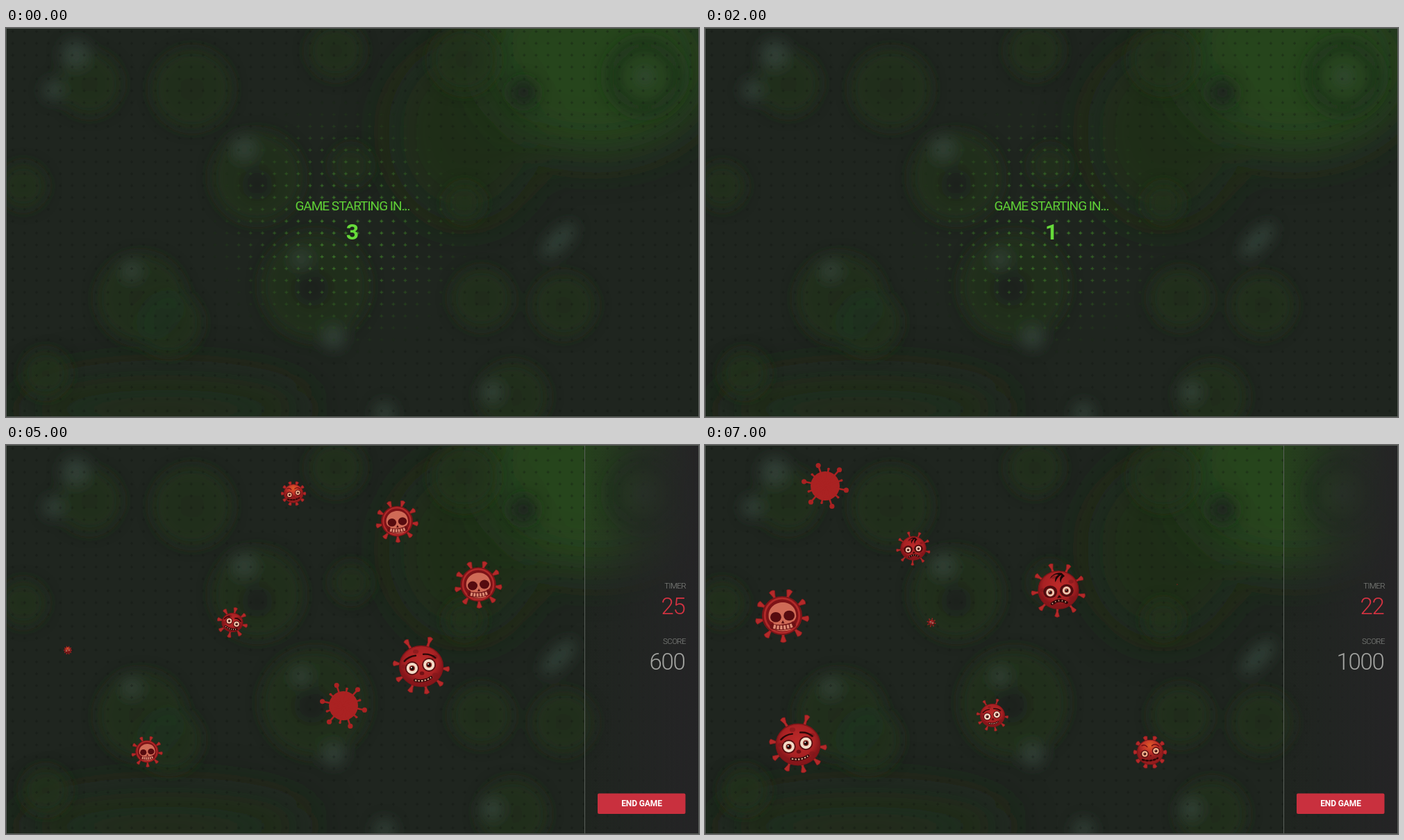
Recreate the animation shown at these times as an HTML page. Size 998 by 561 pixels, loop 8000 ms.

```html
<!DOCTYPE html>
<html lang="en">
<head>
<meta charset="utf-8">
<title>Virus game</title>
<style>
html, body { margin: 0; width: 100%; height: 100%; overflow: hidden; background: #1f251f; }
svg { display: block; width: 998px; height: 561px; }
text { font-family: Roboto, "Open Sans", sans-serif; }
.lead { font-size: 19px; font-weight: 400; letter-spacing: -1px; fill: #5fcf36; }
.count { font-size: 32px; font-weight: 700; fill: #66db3a; }
.label { font-size: 11.5px; font-weight: 300; letter-spacing: -.6px; fill: #8a8c88; }
.value { font-size: 33px; font-weight: 300; letter-spacing: -1.3px; }
.btn { font-size: 12px; font-weight: 700; letter-spacing: -.1px; fill: #fff; }
.mid { text-anchor: middle; }
.end { text-anchor: end; }
</style>
</head>
<body>
<svg viewBox="0 0 998 561" xmlns="http://www.w3.org/2000/svg">
  <defs>
    <filter id="soft" x="-10%" y="-10%" width="120%" height="120%"><feGaussianBlur stdDeviation="10"/></filter>
    <filter id="wide" x="-30%" y="-30%" width="160%" height="160%"><feGaussianBlur stdDeviation="32"/></filter>
    <pattern id="dark" x="1.2" y="-3.5" width="17.13" height="17.1" patternUnits="userSpaceOnUse">
      <path d="M6.5 8.5h4M8.5 6.5v4" stroke="#0c110d" stroke-width="1.5" opacity=".35"/>
    </pattern>
    <pattern id="lit" x="1.2" y="-3.5" width="17.13" height="17.1" patternUnits="userSpaceOnUse">
      <path d="M6.2 8.5h4.6M8.5 6.2v4.6" stroke="#3f7a2b" stroke-width="1.3"/>
    </pattern>
    <radialGradient id="spot"><stop offset=".2" stop-color="#fff"/><stop offset="1" stop-color="#000"/></radialGradient>
    <mask id="centre"><ellipse cx="485" cy="288" rx="205" ry="195" fill="url(#spot)"/></mask>
    <radialGradient id="cell">
      <stop offset=".2" stop-color="#1f2e1c"/><stop offset=".7" stop-color="#20341c"/><stop offset="1" stop-color="#20301d"/>
    </radialGradient>
    <linearGradient id="panel">
      <stop offset="0" stop-color="#242424" stop-opacity=".12"/>
      <stop offset=".5" stop-color="#242525" stop-opacity=".68"/>
      <stop offset="1" stop-color="#252426"/>
    </linearGradient>
    <radialGradient id="red" cy=".4"><stop offset="0" stop-color="#bd2a29"/><stop offset=".75" stop-color="#a82123"/><stop offset="1" stop-color="#86161a"/></radialGradient>
    <radialGradient id="coral" cy=".35"><stop offset="0" stop-color="#d6553e"/><stop offset=".7" stop-color="#c0372e"/><stop offset="1" stop-color="#981f20"/></radialGradient>
    <radialGradient id="orange" cy=".22"><stop offset="0" stop-color="#df5a29"/><stop offset=".6" stop-color="#bd3028"/><stop offset="1" stop-color="#921d1d"/></radialGradient>
  </defs>
  <rect width="998" height="561" fill="#1f251f"/>
  <g id="far" filter="url(#wide)" fill="#25441f"></g>
  <g id="near" filter="url(#soft)"></g>
  <rect width="998" height="561" fill="url(#dark)"/>
  <g id="scene"></g>
  <rect x=".5" y=".5" width="997" height="560" fill="none" stroke="#555a55"/>
</svg>
<script>
const $ = id => document.getElementById(id);
const oval = (x, y, rx, ry, fill, more = '') =>
  `<ellipse cx="${x}" cy="${y}" rx="${rx}" ry="${ry}" fill="${fill}" ${more}/>`;
const dot = (x, y, r, fill, more) => oval(x, y, r, r, fill, more);
const line = (d, color, width, more = '') =>
  `<path d="${d}" fill="none" stroke="${color}" stroke-width="${width}" stroke-linecap="round" ${more}/>`;
const shape = (d, fill) => `<path d="${d}" fill="${fill}"/>`;
const label = (x, y, cls, str, more = '') => `<text x="${x}" y="${y}" class="${cls}" ${more}>${str}</text>`;
const repeat = (n, fn) => Array.from({ length: n }, (_, i) => fn(i)).join('');

// Backdrop: a green corner, soft cells and pale glows, each as x, y, radius
const cells = [[268, 88, 58], [475, 33, 40], [660, 45, 48], [120, 80, 46], [25, 228, 33], [362, 215, 66],
  [445, 372, 78], [497, 198, 29], [660, 252, 28], [685, 390, 44], [195, 390, 64], [235, 425, 47],
  [803, 400, 46], [57, 498, 34], [730, 532, 50]];
const glows = [[100, 38, 20], [68, 90, 14], [343, 174, 17], [425, 333, 13], [472, 446, 16],
  [181, 350, 14], [700, 525, 15], [545, 555, 15], [920, 70, 13]];

$('far').innerHTML = oval(850, 50, 170, 130) + oval(780, 0, 90, 60) +
  oval(660, 150, 110, 130, '#203419', 'opacity=".6"') + oval(230, 550, 210, 50, '#20301d', 'opacity=".8"');
$('near').innerHTML =
  cells.map(c => dot(...c, 'url(#cell)', 'opacity=".75"')).join('') +
  dot(920, 70, 46, 'none', 'stroke="#1d2f1b" stroke-width="22" opacity=".7"') +
  dot(362, 226, 22, '#1c241c') + dot(440, 376, 25, '#1c241c') + dot(745, 93, 19, '#1c271c') +
  glows.map(g => dot(...g, '#37473c', 'opacity=".75"')).join('') +
  oval(796, 306, 32, 13, '#37473c', 'opacity=".75" transform="rotate(-45 796 306)"');

// Virus parts
const INK = '#2b0808', DEEP = '#701014';
const spike = (turn, n) =>
  `<path transform="rotate(${turn})" d="M0 -3.4L${n - 8} -1.5L${n - 1} -3.8Q${n + 2} 0 ${n - 1} 3.8L${n - 8} 1.5L0 3.4z"
    fill="#b32929" stroke="#861a1c" stroke-width=".7"/>`;
const fan = (from, to, n, len) => repeat(n, i => spike(from + (to - from) * i / (n - 1), len));
const ring = (n, turn, len) => repeat(n, i => spike(turn + 360 * i / n, len));
const body = (rx, ry, fill) => oval(0, 0, rx, ry, fill, 'stroke="#7c1518" stroke-width="1.4"');
const eye = (x, y, r, white) =>
  dot(x, y, r + 1.8, '#5a0e11') + dot(x, y, r, white) + dot(x, y, r * .5, '#8d2a22') +
  dot(x, y, r * .33, '#1a0606') + dot(x - r * .12, y - r * .14, r * .12, '#fff');
const eyes = (x1, y1, x2, y2, r, white) => eye(x1, y1, r, white) + eye(x2, y2, r, white);
const spots = (rx, ry) => repeat(5, i =>
  oval(rx * Math.cos(i * 1.26 + .6), ry * Math.sin(i * 1.26 + .6), 4, 3, '#7e171a', 'opacity=".6"'));
const mouth = (d, width, teeth) => line(d, INK, width) +
  line(d, '#dfa98e', width * .5, `style="stroke-linecap:butt" stroke-dasharray="${teeth}"`);

const kinds = {
  worried: { size: 80, art:
    fan(6, 186, 6, 40) + fan(-121, -72, 2, 43) + body(31, 29, 'url(#red)') + spots(24, 22) +
    eyes(-13, 3, 11, -2, 8, '#f3dcc8') +
    line('M-24 -7Q-18 -14 -8 -15M3 -17Q13 -18 20 -12', INK, 2.4) +
    oval(1, 10, 3.2, 2.6, DEEP) + mouth('M-9 20Q4 23 14 16', 4, '2.5 2') },
  goggle: { size: 72, art:
    fan(9, 182, 4, 36) + fan(-137, -32, 4, 33) + body(27, 27, 'url(#coral)') +
    line('M-16 -16Q-5 -25 9 -23', '#e48b73', 3, 'stroke-dasharray="8 5"') +
    eye(-15, 4, 7, '#dfa58b') + eye(8, -4, 8.5, '#dfa58b') +
    oval(-2, 10, 2, 1.4, DEEP) + shape('M-7 20Q-3 11 4 13Q10 14 11 20Q3 16 -7 20z', INK) },
  tired: { size: 56, art:
    ring(10, 0, 28) + body(22, 21, 'url(#orange)') +
    line('M-14 -11Q-9 -14 -5 -9M3 -11Q9 -16 15 -10', DEEP, 1.8) +
    eyes(-9, 3, 10, -2, 5, '#eeb48e') + oval(1, 6, 1.8, 1.3, DEEP) +
    line('M-13 13Q2 17 13 10', INK, 3, 'stroke-dasharray="3 3.4"') },
  skull: { size: 68, art:
    ring(9, 7, 34) + body(25, 24, '#7c1317') + dot(0, 0, 22, 'none', 'stroke="#b02929" stroke-width="2.6"') +
    shape('M-17 3C-20 -21 18 -25 18 1Q17 7 12 8L11 18Q1 22 -10 18L-11 9Q-16 8 -17 3z', '#cf6a56') +
    oval(-8, 2, 7, 6.5, '#560b0f') + oval(9, 0, 7, 6.5, '#560b0f') + shape('M-1 10L1 6L3 10z', '#560b0f') +
    line('M-12 14Q1 17 14 12', '#6c1114', 7) +
    line('M-11 14Q1 17 13 12.5', '#dc8a73', 5, 'style="stroke-linecap:butt" stroke-dasharray="3 1.3"') },
  crazy: { size: 58, art:
    ring(8, 13, 29) + body(20, 18, 'url(#red)') + spots(15, 13) +
    eyes(-6, -3, 8, 3, 5, '#f0c6ab') +
    line('M-15 -7Q-11 -12 -5 -12M5 -8Q11 -9 16 -2', INK, 2) + mouth('M-13 7Q-5 15 8 13', 4, '1.5 2.5') },
  hairy: { size: 86, art:
    ring(9, 13, 43) + body(32, 30, 'url(#red)') + spots(25, 22) +
    shape('M-14 -17Q-6 -27 0 -24Q-7 -21 -5 -12Q-1 -22 5 -24Q0 -17 4 -11Q4 -19 10 -22L5 -27Q-8 -29 -14 -17z', '#190607') +
    oval(-13, 3, 11, 10, '#4b0c0e') + oval(13, 1, 11, 10, '#4b0c0e') + eyes(-13, 4, 13, 1, 6.5, '#efc8b0') +
    shape('M-2 13L1 8L5 12z', INK) + mouth('M-10 22Q1 13 13 20', 4.5, '1.5 4') },
  splat: { size: 66, art: dot(0, 0, 21, '#aa2222') + repeat(12, i => {
    const a = i * Math.PI / 6 + .2, n = i % 2 ? 25 : 31, r = i % 2 ? 1.8 : 3.6;
    const x = n * Math.cos(a), y = n * Math.sin(a);
    return line(`M0 0L${x} ${y}`, '#aa2222', 2.6) + dot(x, y, r, '#aa2222');
  }) }
};

// kind, x, y, peak beat, peak width, beat of the hit
const viruses = [
  ['worried', 203, 82, 0, 76, 1.2], ['goggle', 677, 71, .2, 79, 1.2], ['tired', 307, 252, 0, 55, .2],
  ['worried', 459, 258, 0, 54, .5], ['goggle', 383, 402, 0, 68, .2], ['tired', 89, 296, .45, 60],
  ['tired', 414, 70, 1, 62], ['skull', 563, 110, 1.15, 90], ['goggle', 486, 376, 1, 70, 2],
  ['skull', 203, 442, 1, 78], ['skull', 680, 201, 2, 68], ['crazy', 326, 256, 2.42, 70],
  ['worried', 598, 319, 2, 81, 2.4], ['worried', 173, 59, 3, 74, 4], ['hairy', 300, 149, 3, 86],
  ['worried', 414, 390, 3, 80], ['skull', 111, 246, 3.45, 90], ['hairy', 509, 209, 4, 78],
  ['worried', 134, 432, 4, 82], ['tired', 641, 443, 4.45, 82]
];
const RISE = 1, FALL = 2.2, SPLAT = .75;
const swell = d => {
  const k = d < 0 ? -d / RISE : d / FALL;
  return k < 1 ? (1 + Math.cos(Math.PI * k)) / 2 : 0;
};
const place = (kind, x, y, width, alpha = 1) =>
  `<g transform="translate(${x} ${y}) scale(${width / kinds[kind].size})" opacity="${alpha}">${kinds[kind].art}</g>`;
const virus = (beat, [kind, x, y, peak, width, hit = Infinity]) => {
  const age = beat - hit;
  if (age < 0) return place(kind, x, y, width * swell(beat - peak));
  return age < SPLAT ? place('splat', x, y, 66 * (1 - .45 * age), 1 - .6 * age) : '';
};

const intro = n =>
  '<rect width="998" height="561" fill="url(#lit)" mask="url(#centre)"/>' +
  label(499, 263, 'lead mid', 'GAME STARTING IN...') + label(499, 304.5, 'count mid', n);

const game = beat =>
  viruses.map(v => virus(beat, v)).join('') +
  '<rect x="834" width="164" height="561" fill="url(#panel)"/><path d="M833.5 0V561" stroke="#5a605a"/>' +
  label(979, 207, 'label end', 'TIMER') +
  label(977.5, 244, 'value end', Math.floor(28.2 - 1.5 * beat), 'fill="#d53342"') +
  label(979, 287, 'label end', 'SCORE') +
  label(977.5, 324, 'value end', Math.min(300 * beat, 200 + 200 * beat), 'fill="#a3a4a1"') +
  '<rect x="852" y="502.5" width="126.5" height="29.5" rx="2" fill="#c9303e"/>' +
  label(915.5, 521, 'btn mid', 'END GAME');

const COUNT = 3, STEPS = 8;
let shown = -1;
const start = performance.now();
function draw() {
  const i = Math.floor((performance.now() - start) / 1000) % STEPS;
  if (i !== shown) {
    shown = i;
    $('scene').innerHTML = i < COUNT ? intro(COUNT - i) : game(i - COUNT);
  }
  requestAnimationFrame(draw);
}
draw();
</script>
</body>
</html>
```
